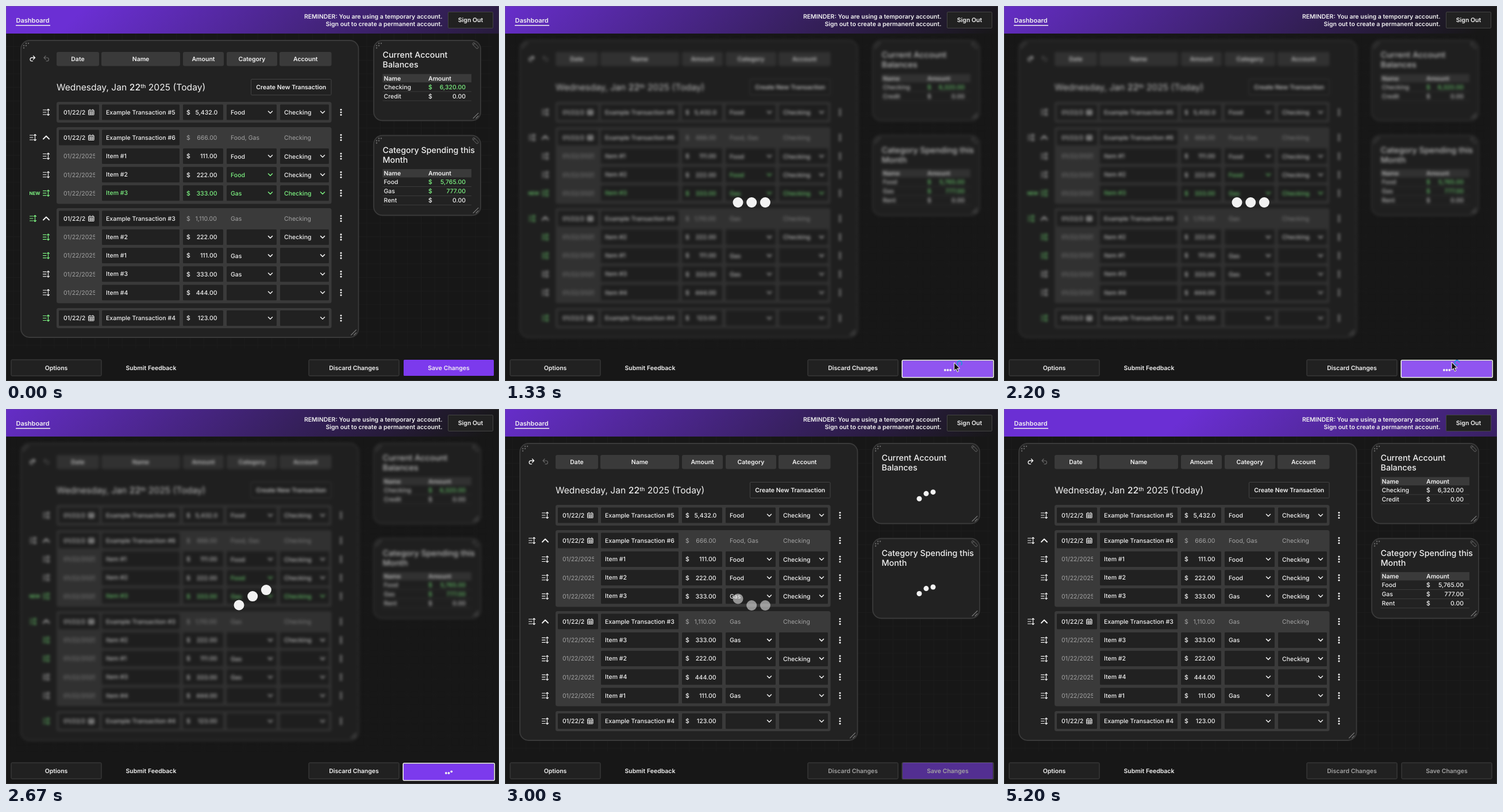
These frames come from a looping animation (858 px wide and 653 px high, 5270 ms). An HTML page:

```html
<!DOCTYPE html>
<html lang="en">
<head>
<meta charset="utf-8">
<title>Dashboard</title>
<style>
html, body { margin: 0; width: 100%; height: 100%; overflow: hidden; background: #171717; }
svg { display: block; width: 858px; height: 653px; font: 500 10.5px Inter, "Liberation Sans", sans-serif; text-rendering: geometricPrecision; }
.line { fill: none; stroke-linecap: round; stroke-linejoin: round; }
</style>
</head>
<body>
<svg id="stage" viewBox="0 0 858 653"></svg>
<script>
const WHITE = '#f2f2f2', DIM = '#a3a3a3', GREEN = '#7df482';
const BG = '#171717', PANEL = '#222', FIELD = '#212121', GREY = '#3a3a3a', EDGE = '#444';
const LOOP = 5270, STEP = 1000 / 15;
const SAVE = 1200, DONE = 2933, LOADED = 3400;

// Drawing helpers
const rect = (x, y, w, h, fill, more = '') =>
  `<rect x="${x}" y="${y}" width="${w}" height="${h}" fill="${fill}" ${more}/>`;
const text = (x, y, s, fill = WHITE, more = '') =>
  `<text x="${x}" y="${y}" fill="${fill}" ${more}>${s}</text>`;
const path = (d, stroke, width = 1.3, more = '') =>
  `<path class="line" d="${d}" stroke="${stroke}" stroke-width="${width}" ${more}/>`;
const dot = (x, y, r, fill) => `<circle cx="${x}" cy="${y}" r="${r}" fill="${fill}"/>`;
const MID = 'text-anchor="middle"', END = 'text-anchor="end"', BOLD = 'font-weight="600"';
const clip = id => `clip-path="url(#${id})"`;

const button = (x, y, w, h, label, fill = WHITE) =>
  rect(x + .5, y + .5, w - 1, h - 1, FIELD, `stroke="${EDGE}" rx="1.5"`) +
  text(x + w / 2, y + h / 2 + 3.8, label, fill, MID + BOLD);

const sortIcon = (x, y, c) =>
  path(`M${x - 5.5} ${y - 4}h5.5m-5.5 4h5.5m-5.5 4h5.5M${x + 3.5} ${y - 5.5}v11m-2 -2l2 2l2 -2m-4 -7l2 -2l2 2`, c, 1.15);
const chevron = (x, y, c, w = 3.5) => path(`M${x - w} ${y - w / 2}l${w} ${w}l${w} ${-w}`, c, 1.5);
const calendar = (x, y) =>
  path(`M${x - 4.5} ${y - 3.5}h9v8h-9zM${x - 4.5} ${y - 1}h9M${x - 4.5} ${y + 1.8}h9M${x - 1.5} ${y - 1}v5.5M${x + 1.5} ${y - 1}v5.5M${x - 2.5} ${y - 5}v1.5M${x + 2.5} ${y - 5}v1.5`, WHITE, 1);

function field(x, y, w) { return rect(x, y - 13.5, w, 27, FIELD, 'rx="1.5"'); }

function select(x, w, y, value, c) {
  return field(x, y, w) + text(x + 7, y + 4, value, c) + chevron(x + w - 11, y, c);
}

function amount(y, value, c, weight) {
  const more = `font-weight="${weight}"`;
  return text(314, y + 3.8, '$', c, more) + (value.length > 6
    ? text(329.5, y + 3.8, value, c, more + clip('cutAmount'))
    : text(367.5, y + 3.8, value, c, more + END));
}

// kind: 'single', 'parent' or 'item'; green lists the highlighted parts
function row(y, kind, name, sum, cat = '', acc = '', green = '') {
  const hue = key => green.includes(key) ? GREEN : WHITE;
  const parent = kind === 'parent', item = kind === 'item';
  let s = sortIcon(parent ? 47 : 70, y, hue('s'));
  if (parent) s += path(`M65 ${y + 2.5}l5 -5l5 5`, WHITE, 1.9);
  if (green.includes('new')) s += text(40.5, y + 2.8, 'NEW', GREEN, 'font-size="7.9" font-weight="700"');
  s += item
    ? text(100, y + 3.8, '01/22/2025', DIM, 'font-weight="400"' + clip('cutItem'))
    : field(92, y, 70) + text(100, y + 3.8, '01/22/2025', WHITE, clip('cutDate')) + calendar(148.5, y);
  s += field(167, y, 135) + text(174, y + 3.5, name, hue('n'));
  if (parent) {
    s += amount(y, sum, DIM, 400) + text(391, y + 3.8, cat, DIM, 'font-weight="400"') +
      text(484, y + 3.8, acc, DIM, 'font-weight="400"');
  } else {
    s += field(308, y, 70) + amount(y, sum, hue('a'), 500) +
      select(384, 87, y, cat, hue('c')) + select(477, 85, y, acc, hue('k'));
  }
  return s + [-4.5, 0, 4.5].map(d => dot(583, y + d, 1.55, WHITE)).join('');
}

const ITEMS = {
  1: ['Item #1', '111.00', 'Gas', ''], 2: ['Item #2', '222.00', '', 'Checking'],
  3: ['Item #3', '333.00', 'Gas', ''], 4: ['Item #4', '444.00', '', '']
};

function rows(dirty) {
  const g = key => dirty ? key : '';
  const order = dirty ? [2, 1, 3, 4] : [3, 2, 4, 1];
  return row(185, 'single', 'Example Transaction #5', '5,432.00', 'Food', 'Checking') +
    row(229, 'parent', 'Example Transaction #6', '666.00', 'Food, Gas', 'Checking') +
    row(261.5, 'item', 'Item #1', '111.00', 'Food', 'Checking') +
    row(293.7, 'item', 'Item #2', '222.00', 'Food', 'Checking', g('c')) +
    row(325.8, 'item', 'Item #3', '333.00', 'Gas', 'Checking', g('new s a c k')) +
    row(370, 'parent', 'Example Transaction #3', '1,110.00', 'Gas', 'Checking', g('s')) +
    order.map((n, i) => row(402.4 + i * 32.2, 'item', ...ITEMS[n], i < 2 ? g('s') : '')).join('') +
    row(543.5, 'single', 'Example Transaction #4', '123.00', '', '', g('s'));
}

function table(top, list, dirty) {
  return rect(655.5, top, 154.5, 14.5, GREY) +
    text(657.5, top + 11, 'Name', WHITE, BOLD) + text(735, top + 11, 'Amount', WHITE, BOLD) +
    list.map(([name, sum], i) => {
      const y = top + 26 + i * 16, c = dirty && sum !== '0.00' ? GREEN : WHITE;
      return text(657.5, y, name) + text(735, y, '$', c) + text(800, y, sum, c, END) +
        rect(655.5, y + 4, 154.5, 1, GREY);
    }).join('');
}
const tables = dirty =>
  table(118.5, [['Checking', '6,320.00'], ['Credit', '0.00']], dirty) +
  table(284, [['Food', '5,765.00'], ['Gas', '777.00'], ['Rent', '0.00']], dirty);

function panel(x, y, w, h) {
  const r = x + w, b = y + h;
  return rect(x + 1, y + 1, w - 2, h - 2, PANEL, `rx="15" stroke="${GREY}" stroke-width="1.8"`) +
    [[10, 6], [14, 6], [6, 10], [10, 10], [6, 14]].map(([a, c]) => dot(x + a, y + c, 1.2, '#666')).join('') +
    path(`M${r - 14} ${b - 5}l9 -9M${r - 9} ${b - 5}l4 -4`, '#777', 1.1);
}

function card(y, h, lines) {
  return panel(639, y, 188, h) +
    `<g transform="translate(817 ${y + 10}) rotate(45)">` +
    rect(-6, -2, 12, 4, 'none', 'stroke="#5c5c5c" rx="1.5"') + path('M-3.5 -2v4', '#5c5c5c', 1) + '</g>' +
    lines.map((s, i) => text(655.5, y + 31 + i * 17, s, WHITE, 'font-size="14.3"')).join('');
}

function grid() {
  let d = '';
  for (let x = 13; x < 858; x += 23.65) d += `M${x} 48V596`;
  for (let y = 47; y < 596; y += 23.65) d += `M0 ${y}H845`;
  return path(d, '#1d1d1d', 1);
}

function base() {
  const heads = [[88, 74, 'Date'], [166, 137, 'Name'], [308, 71, 'Amount'], [384, 88, 'Category'], [476, 90.5, 'Account']];
  const boxes = [[167, 36], [211, 133.5], [352, 165.5], [526, 35]];
  return grid() + panel(25, 59, 589.5, 519) +
    path('M50 90h-5a2.8 2.8 0 0 0 0 5.8h1.5M47.5 87l3 3l-3 3', WHITE, 1.3) +
    path('M66.500 90h5a2.800 2.800 0 0 1 0 5.800h-1.500M69 87l-3 3l3 3', '#666', 1.2) +
    heads.map(([x, w, s]) => rect(x, 80, w, 24.5, GREY, 'rx="3"') + text(x + w / 2, 96, s, WHITE, MID + BOLD)).join('') +
    `<text x="88" y="147" fill="${WHITE}" font-size="15.7" font-weight="400">Wednesday, Jan <tspan font-weight="500">22<tspan font-size="9.8" dy="-4">th</tspan></tspan><tspan dy="4"> 2025 (Today)</tspan></text>` +
    button(426, 127, 140.5, 28.5, 'Create New Transaction') +
    boxes.map(([y, h]) => rect(88, y, 478.5, h, GREY, 'rx="3.5"')).join('') +
    card(59, 141.5, ['Current Account', 'Balances']) +
    card(224.5, 141, ['Category Spending this', 'Month']);
}

const dots = id => `<g id="${id}">${dot(0, 0, 1, WHITE).repeat(3)}</g>`;

const HAND = 'M3.500 11V1.800a1.300 1.300 0 0 1 2.600 0V7l4.200 .9q1.900 .5 1.600 2.600l-.8 4.500l-.8 2H5L.5 11.500q-1 -1.500 .3 -2.100q1 -.4 1.600 .4z';
const ARROW = 'M0 0V14l3.200 -3l2.300 5.200l2.300 -1l-2.300 -5h4.300z';

const stage = document.getElementById('stage');
stage.innerHTML = `
<defs>
  <linearGradient id="sweep" gradientUnits="userSpaceOnUse">
    <stop offset="0" stop-color="#6b2fd4"/><stop offset="1" stop-color="${BG}"/>
  </linearGradient>
  <clipPath id="cutDate"><rect width="139" height="653"/></clipPath>
  <clipPath id="cutItem"><rect width="155" height="653"/></clipPath>
  <clipPath id="cutAmount"><rect width="368" height="653"/></clipPath>
</defs>
${rect(0, 0, 858, 653, BG)}
<g id="page">${base()}
  <g id="oldRows">${rows(true)}</g><g id="newRows">${rows(false)}</g>
  <g id="oldTables">${tables(true)}</g><g id="newTables">${tables(false)}</g>
</g>
${dots('cardDots1')}${dots('cardDots2')}${dots('bigDots')}
${rect(0, 0, 858, 48, 'url(#sweep)')}
${text(17.5, 28.5, 'Dashboard', WHITE, BOLD + ' font-size="11"')}${rect(17, 33, 60, 1.5, WHITE)}
${text(759.5, 21.5, 'REMINDER: You are using a temporary account.', WHITE, END + BOLD)}
${text(759.5, 35, 'Sign out to create a permanent account.', WHITE, END + BOLD)}
${button(769, 10, 79, 29, 'Sign Out')}
${rect(0, 597, 858, 56, BG)}
${button(8.5, 615.5, 158, 29, 'Options')}
${text(252.5, 634, 'Submit Feedback', WHITE, MID + BOLD)}
<g id="discardOn">${button(526.5, 615.5, 158, 29, 'Discard Changes')}</g>
<g id="discardOff">${button(526.5, 615.5, 158, 29, 'Discard Changes', DIM)}</g>
${rect(692, 616, 157, 28, FIELD, 'id="save" rx="1.5"')}
${rect(691.2, 616.7, 159, 30, 'none', `id="ring" rx="2" stroke="${WHITE}" stroke-width="1.6"`)}
${text(770.5, 634, 'Save Changes', WHITE, MID + BOLD + ' id="saveText"')}
${dots('saveDots')}
${rect(.5, .5, 857, 652, 'none', 'stroke="#777" stroke-opacity=".25"')}
<g id="cursor">
  <path id="hand" d="${HAND}" fill="#111" stroke="#fff" stroke-width="1.1"/>
  <path id="arrow" d="${ARROW}" fill="#111" stroke="#fff" stroke-width="1"/>
  <circle id="busy" cx="9.500" cy="1" r="4" fill="none" stroke="#2196d8" stroke-width="1.800" stroke-dasharray="20 5.1"/>
</g>`;

const $ = id => document.getElementById(id);
const set = (id, attrs) => { for (const k in attrs) $(id).setAttribute(k, attrs[k]); };
const show = (id, on) => set(id, { visibility: on ? 'visible' : 'hidden' });
const ramp = (t, from, span) => Math.min(1, Math.max(0, (t - from) / span));
const mix = (a, b, p) => `rgb(${a.map((v, i) => Math.round(v + (b[i] - v) * p))})`;

const VIOLET = [124, 58, 237], LIT = [144, 85, 240], OFF = [33, 33, 33];
const TRACK = [[760, 866, 570], [870, 818, 602], [940, 792, 622], [1000, 787, 623], [1200, 787, 623],
  [1400, 779, 620], [2220, 779, 620], [2480, 772, 660]];

function cursorAt(t) {
  const i = TRACK.findIndex(p => p[0] > t);
  if (i < 1) return null;
  const [t0, x0, y0] = TRACK[i - 1], [t1, x1, y1] = TRACK[i], p = (t - t0) / (t1 - t0);
  return [x0 + (x1 - x0) * p, y0 + (y1 - y0) * p];
}

// Three dots hop one after another, then rest
function bounce(id, t, start, x, y, gap, r, lift) {
  [...$(id).children].forEach((c, i) => {
    const phase = ((t - start - i * -0 + (i * 108)) % 1050 + 1050) % 1050;
    const h = phase < 457 ? (1 - Math.cos(phase / 457 * 2 * Math.PI)) / 2 : 0;
    c.setAttribute('cx', x + (i - 1) * gap);
    c.setAttribute('cy', y - lift * h);
    c.setAttribute('r', r);
  });
}

function draw(t) {
  const saving = t >= SAVE && t < DONE, done = t >= DONE;

  const d = (t - 2200) / 1000, s = -80 + 45 * d * d;
  set('sweep', { x1: s, y1: 0, x2: s + 475, y2: 475 });

  $('page').style.filter = saving ? 'blur(2.6px)' : 'none';
  $('page').style.opacity = saving ? 1 - .25 * ramp(t, SAVE - 60, 150) : 1;
  show('oldRows', !done);
  show('newRows', done);
  show('oldTables', !done);
  show('newTables', t >= LOADED);

  const loading = done && t < LOADED;
  show('cardDots1', loading);
  show('cardDots2', loading);
  bounce('cardDots1', t, 2955, 733, 157.5, 12, 4.5, 13.5);
  bounce('cardDots2', t, 2955, 733, 322.8, 12, 4.5, 13.5);
  set('bigDots', { opacity: done ? 1 - ramp(t, DONE, 150) : ramp(t, SAVE - 60, 150) });
  bounce('bigDots', t, 2647, 429.2, 342, 23.7, 9, 27);

  const cur = cursorAt(t);
  const over = cur && cur[0] < 849 && cur[1] > 610 && cur[1] < 645;
  const hover = over ? ramp(t, 880, 100) : 0;
  const off = ramp(t, DONE, 150);
  const tall = saving;
  set('save', {
    x: 692, y: tall ? 617.5 : 616, height: tall ? 28.5 : 28,
    fill: done ? mix(VIOLET, OFF, off) : mix(VIOLET, LIT, hover),
    stroke: off === 1 ? EDGE : 'none'
  });
  set('ring', {
    opacity: done ? .35 * (1 - off) : saving ? 1 : 0,
    y: done ? 615.700 : 616.7, height: done ? 28.800 : 30
  });
  set('saveText', { fill: done ? DIM : WHITE });
  show('saveText', !saving);
  show('saveDots', saving);
  bounce('saveDots', t, 2770, 770.6, 634, 4.7, 1.9, 5.4);
  show('discardOn', !done);
  show('discardOff', done);

  const busy = cur && t >= SAVE;
  show('hand', over && !busy);
  show('arrow', cur && (busy || !over));
  show('busy', busy);
  if (cur) {
    const shift = over && !busy ? -3 : 0;
    set('cursor', { transform: `translate(${cur[0] + shift} ${cur[1]})` });
    set('busy', { transform: `rotate(${t * .36} 9.5 1)` });
  }
}

const begin = performance.now();
function tick() {
  const t = (performance.now() - begin) % LOOP;
  draw(Math.floor((t + 5) / STEP) * STEP);
  requestAnimationFrame(tick);
}
tick();
</script>
</body>
</html>
```
